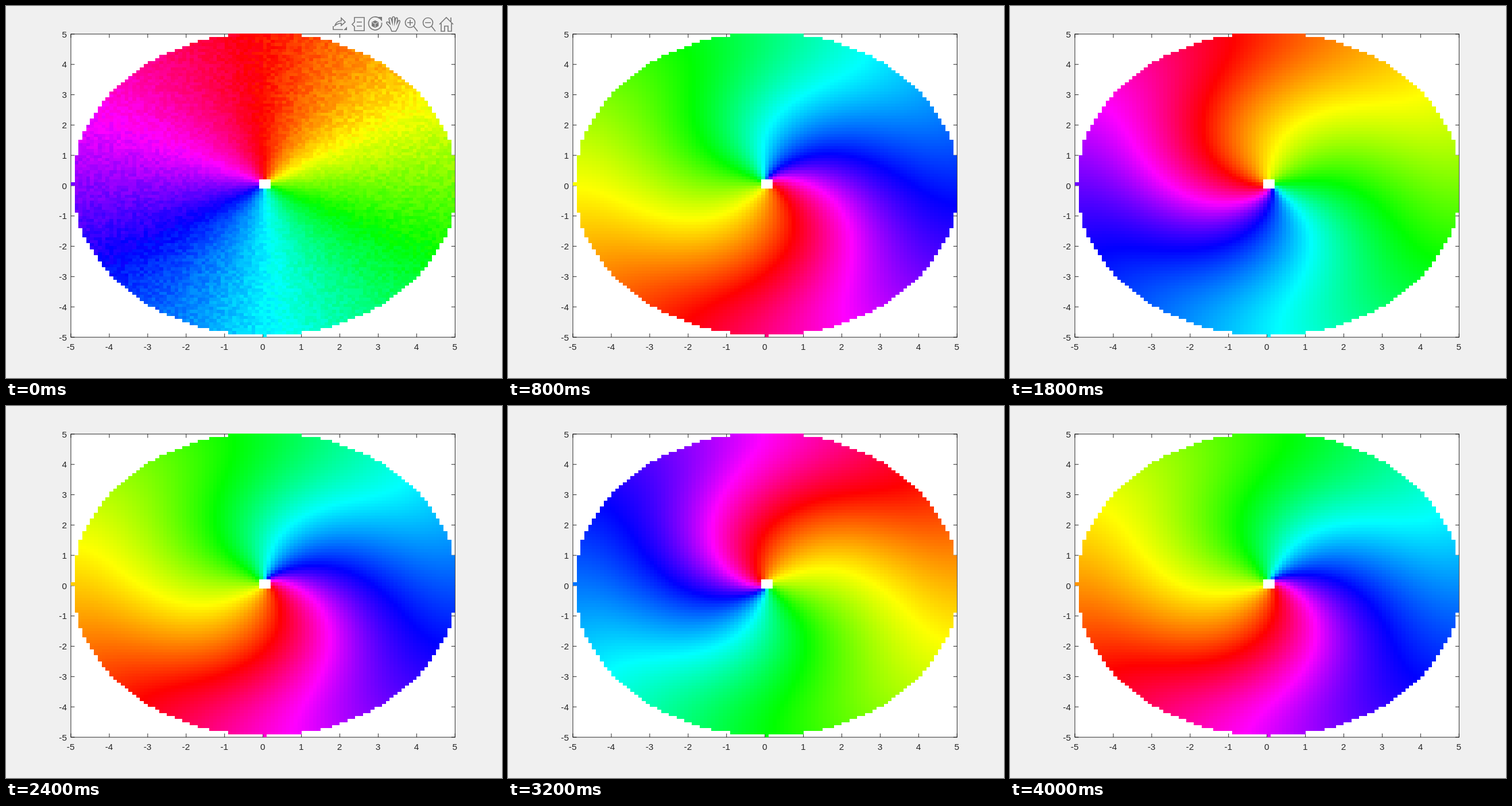
Write an HTML page with a canvas that moves like this. It is 864 px wide and 648 px high and loops after 4200 ms.

```html
<!DOCTYPE html>
<html lang="en">
<head>
<meta charset="utf-8">
<title>Spiral wave phase</title>
<style>
  html, body { margin: 0; width: 100%; height: 100%; overflow: hidden; background: #f0f0f0; }
  canvas { display: block; }
</style>
</head>
<body>
<canvas id="stage" width="864" height="648"></canvas>
<script>
const ctx = document.getElementById('stage').getContext('2d');
const STEP = 200, STEPS = 21, RAD = Math.PI / 180;
const left = 113, bottom = 577, cellW = 6.692, cellH = 5.286;
const px = i => Math.round(left + cellW * i);
const py = j => Math.round(bottom - cellH * j);

// Seeded random numbers for the initial noise
let seed = 7;
const random = () => (seed = seed * 16807 % 2147483647) / 2147483647;

// Each cell takes its colour from its lower-left corner
const cells = [];
for (let i = 0; i < 100; i++) {
  for (let j = 0; j < 100; j++) {
    const x = i - 50, y = j - 50, q = x * x + y * y;
    if (q < 4 || q > 2500) continue;
    const r = Math.sqrt(q) / 10;
    cells.push({
      x: px(i), y: py(j + 1), w: px(i + 1) - px(i), h: py(j) - py(j + 1),
      angle: Math.atan2(y, x) / RAD,
      twist: 27.5 * (1 + Math.cos(Math.PI * r / 5)) + 35 * Math.exp(-3 * r),
      skew: 0.49 / (r + 0.6),
      skewAngle: (40 + 18 * r) * RAD,
      noise: (random() * 2 - 1) * Math.min(6, 1.5 + 1.5 * r)
    });
  }
}

// Phase of a rotating wave, pulled off centre and slightly uneven
function drawCells(step) {
  const rest = Math.exp(-step / 1.05), grown = 1 - rest;
  const base = 65 + 43.1 * step + 28 * rest;
  for (const c of cells) {
    const p = (base + grown * c.twist - c.angle + (step ? 0 : c.noise)) * RAD;
    const e = c.skew * (1 - rest * rest);
    const phase = Math.atan2(Math.sin(p) + e * Math.sin(c.skewAngle),
                             Math.cos(p) + e * Math.cos(c.skewAngle));
    const hue = phase / RAD + 4.5 * grown * Math.cos(2 * phase - 0.3);
    ctx.fillStyle = `hsl(${(hue + 360).toFixed(1)}, 100%, 50%)`;
    ctx.fillRect(c.x, c.y, c.w, c.h);
  }
}

function drawAxes() {
  const top = 48.9, right = 782.3, midX = (left + right) / 2, midY = (top + bottom) / 2;
  ctx.fillStyle = '#fff';
  ctx.fillRect(left, top, right - left, bottom - top);
  ctx.strokeStyle = ctx.fillStyle = '#262626';
  ctx.lineWidth = 1;
  ctx.strokeRect(left, top, right - left, bottom - top);
  ctx.font = '15.4px "Liberation Sans", Arial, sans-serif';
  ctx.beginPath();
  for (let n = -5; n <= 5; n++) {
    const x = midX + 66.92 * n, y = midY - 52.8 * n;
    ctx.moveTo(x, top); ctx.lineTo(x, top + 6.5);
    ctx.moveTo(x, bottom - 6.5); ctx.lineTo(x, bottom);
    ctx.moveTo(left, y); ctx.lineTo(left + 6.5, y);
    ctx.moveTo(right - 6.5, y); ctx.lineTo(right, y);
    ctx.textAlign = 'center';
    ctx.fillText(n, x - 0.4, 599);
    ctx.textAlign = 'right';
    ctx.fillText(n, 106, y + 5.6);
  }
  ctx.stroke();
}

const outlines = new Path2D(`
  M573 34C575 28 580 26 584 26V21L591 28L584 34V30C580 30 577 31 573 34Z M570 35V41H587
  M624 20H607V28L603 32L607 36V43H624Z M611 28H620 M611 35H620
  M651 22A11.5 11.5 0 1 0 654.5 29
  M669 37L663 30Q662 27 666 28L669 31L667 22Q669 19 671 22L673 29V20Q675 17 677 20V29L679 21Q682 19 682 23L681 30L684 25Q687 25 686 28L682 39L679 44H672Z
  M712.5 29A8.5 8.5 0 1 1 695.5 29A8.5 8.5 0 1 1 712.5 29 M710 35L717 44 M699 29H709 M704 24V34
  M743.5 29A8.5 8.5 0 1 1 726.5 29A8.5 8.5 0 1 1 743.5 29 M741 35L748 44 M730 29H740
  M755 32L767 20L779 32 M758 30V44H764V35H770V44H776V30 M775 20V27`);
const solids = new Path2D('M594 36V42H588Z M648 19H655V27Z M643 25L649 28V35L643 38L637 35V28Z');
const cubeEdges = new Path2D('M638 28.5L643 31L648 28.5M643 31V37');

function drawToolbar() {
  ctx.strokeStyle = ctx.fillStyle = '#7a7a7a';
  ctx.lineWidth = 1.7;
  ctx.stroke(outlines);
  ctx.fill(solids);
  ctx.strokeStyle = '#f0f0f0';
  ctx.lineWidth = 1;
  ctx.stroke(cubeEdges);
}

let shown = -1;
function tick() {
  const step = Math.floor(performance.now() / STEP) % STEPS;
  if (step !== shown) {
    shown = step;
    ctx.fillStyle = '#f0f0f0';
    ctx.fillRect(0, 0, 864, 648);
    drawAxes();
    drawCells(step);
    if (step < 2 || step === 18) drawToolbar();
  }
  requestAnimationFrame(tick);
}
tick();
</script>
</body>
</html>
```
